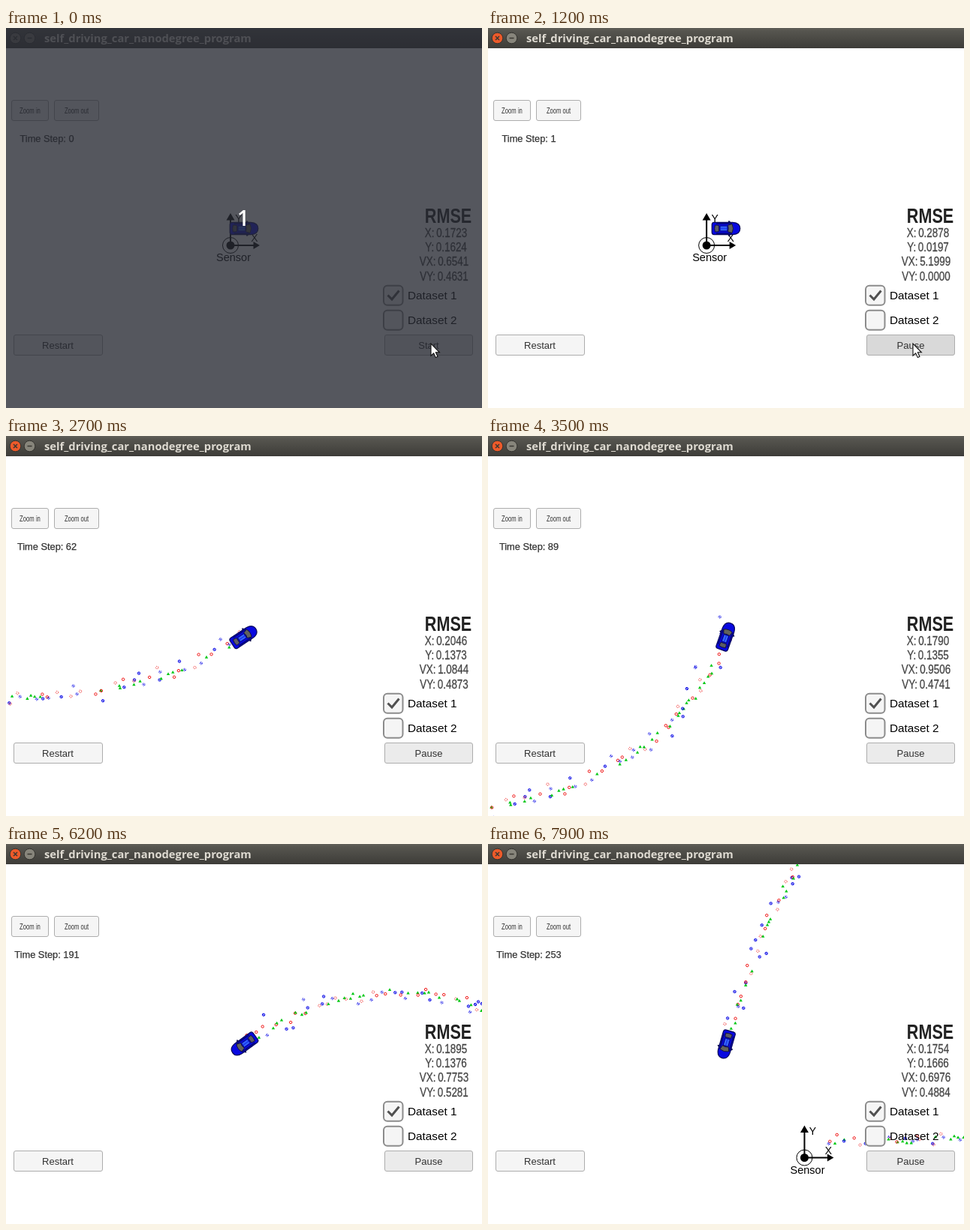
An HTML page that plays this animation: 634 px wide and 507 px high, repeating every 8000 ms.

```html
<!DOCTYPE html>
<html lang="en">
<head>
<meta charset="utf-8">
<title>Tracking simulator</title>
<style>
  html, body { margin: 0; width: 100%; height: 100%; overflow: hidden; background: #fff; }
  svg { display: block; width: 100%; height: 100%; }
  text { font-family: "Liberation Sans", Arial, sans-serif; }
  .title, .count { font-family: "Open Sans", "Noto Sans", sans-serif; }
  .title { font-weight: 700; font-size: 14.75px; }
  .count { font-weight: 600; font-size: 28px; }
</style>
</head>
<body>
<svg id="stage" viewBox="0 0 634 507" xmlns="http://www.w3.org/2000/svg">
  <defs>
    <linearGradient id="bar" x2="0" y2="1">
      <stop offset="0" stop-color="#605f58"/>
      <stop offset=".15" stop-color="#56554f"/>
      <stop offset="1" stop-color="#3d3c38"/>
    </linearGradient>
  </defs>
  <rect width="634" height="507" fill="#fff"/>

  <g id="world">
    <g id="dots" fill="none"></g>
    <g id="sensor">
      <circle r="10.5" fill="#fff" stroke="#000"/>
      <circle r="5.5"/>
      <path d="M0 0V-36M0 0H33" stroke="#000" stroke-width="2"/>
      <path d="M0 -43L5.5 -33.5H-5.5ZM39 0L30.5 5V-5Z"/>
      <g font-size="14" text-anchor="middle">
        <text x="11" y="-31">Y</text>
        <text x="32" y="-5">X</text>
        <text x="4" y="21" font-size="14.5">Sensor</text>
      </g>
    </g>
  </g>

  <g id="car">
    <path d="M6 -8L4 -10L3 -8M6 8L4 10L3 8" fill="#0a0a50" stroke="#0a0a50"/>
    <path d="M-16 -8.2H9Q18.8 -7.5 18.8 0T9 8.2H-16Q-18.8 8 -18.8 5V-5Q-18.8 -8 -16 -8.2Z"
          fill="#0808e0" stroke="#08085a" stroke-width="1.2"/>
    <path d="M-13 -6.5H8M-13 6.5H8" stroke="#06066e" stroke-width="1.4"/>
    <path d="M-14.5 -4.5L-9.5 -4V4L-14.5 4.5Q-16 0 -14.5 -4.5Z" fill="#5c5c66" stroke="#101030" stroke-width=".8"/>
    <path d="M2.5 -4.2L8 -6Q11 0 8 6L2.5 4.2Q4 0 2.5 -4.2Z" fill="#62625c" stroke="#101030" stroke-width=".8"/>
    <path d="M-8 -3.5H2V3.5H-8Z" fill="#1c3cf0" stroke="#06066e" stroke-width=".8"/>
    <path d="M-7 -1.6H1M-7 1.6H1" stroke="#4c86ff" stroke-width=".9"/>
  </g>

  <g id="ui" text-anchor="middle"></g>

  <g id="head">
    <rect width="634" height="27" fill="url(#bar)"/>
    <circle id="close" cx="12.5" cy="13.5" r="7.3" stroke="#33322e"/>
    <circle id="mini" cx="31.5" cy="13.5" r="7.3" stroke="#33322e"/>
    <path d="M10 11L15 16M15 11L10 16M28.5 13.5H34.5" stroke="#3a3833" stroke-width="1.5"/>
    <text class="title" x="51" y="18.7" fill="#dfdbd2">self_driving_car_nanodegree_program</text>
  </g>

  <g id="shade">
    <rect width="634" height="507" fill="#282b33" fill-opacity=".79"/>
    <text class="count" x="316" y="264" fill="#fff" text-anchor="middle">1</text>
  </g>
  <path id="cursor" d="M566 421V437.2L569.7 433.8L572.3 439.6L575 438.4L572.4 432.8H577.4Z"
        fill="#fff" stroke="#111" stroke-width="1.1"/>
</svg>

<script>
const LOOP = 8000, TICK = 100, HOLDS = [3600, 4700, 5000];
const CX = 317, CY = 267, LAST = 253;
const START = [18, -23], END = [-104.5, -151.5];
const NS = "http://www.w3.org/2000/svg";
const $ = id => document.getElementById(id);

function add(parent, tag, attrs, text) {
  const node = document.createElementNS(NS, tag);
  for (const key in attrs) node.setAttribute(key, attrs[key]);
  if (text !== undefined) node.textContent = text;
  parent.appendChild(node);
  return node;
}

// key points: time in ms, time step, RMSE of x, y, vx, vy
const LOG = [
  [1200, 1, 0.2878, 0.0197, 5.1999, 0],
  [2700, 62, 0.2046, 0.1373, 1.0844, 0.4873],
  [3500, 89, 0.1790, 0.1355, 0.9506, 0.4741],
  [4900, 141, 0.1952, 0.1470, 0.8733, 0.4267],
  [6200, 191, 0.1895, 0.1376, 0.7753, 0.5281],
  [7900, LAST, 0.1754, 0.1666, 0.6976, 0.4884]
];
const IDLE = [0.1723, 0.1624, 0.6541, 0.4631];

// the car turns left in one long sweep; degrees and pixels per step
const phase = n => Math.PI * n / LAST;
const heading = n => 127 * (1 - Math.cos(phase(n))) - 3 * Math.sin(3 * phase(n));
const speed = n => 7.52 + 0.45 * Math.cos(1.8 * phase(n));

function drive() {
  const path = [START];
  for (let n = 0; n < LAST; n++) {
    const [x, y] = path[n], a = heading(n + 0.5) * Math.PI / 180, v = speed(n + 0.5);
    path.push([x + v * Math.cos(a), y - v * Math.sin(a)]);
  }
  // spread the remaining gap over the whole drive
  const gap = END.map((e, k) => e - path[LAST][k]);
  return path.map((p, n) => p.map((c, k) => c + gap[k] * n / LAST));
}
const path = drive();

let seed = 20;
function rand() {
  seed = (seed + 0x6D2B79F5) | 0;
  let r = Math.imul(seed ^ seed >>> 15, 1 | seed);
  r = r + Math.imul(r ^ r >>> 7, 61 | r) ^ r;
  return ((r ^ r >>> 14) >>> 0) / 4294967296;
}
const noise = sd => (rand() + rand() + rand() + rand() - 2) * 1.73 * sd;

function ring(group, x, y, color, marked) {
  const attrs = { cx: x, cy: y, r: 1.7, stroke: color };
  if (rand() < 0.4) attrs["stroke-dasharray"] = "1 1";
  add(group, "circle", attrs);
  if (marked) add(group, "path", { d: `M${x - 1} ${y - 1}l2 2`, stroke: color });
}

// lidar and radar readings take turns; the estimate is a triangle
const marks = path.map(([x, y], n) => {
  const g = add($("dots"), "g", { display: "none" });
  if (n < 2) return g;
  if (n % 2) {
    const range = Math.hypot(x, y), dr = noise(8) / range, turn = noise(0.024);
    ring(g, x + x * dr - y * turn, y + y * dr + x * turn, "#0000e6", true);
  } else {
    ring(g, x + noise(4), y + noise(4), "#f01010", false);
  }
  if (rand() < 0.5) {
    add(g, "path", { d: `M${x + noise(2)} ${y + noise(2) - 2}l2.2 3.8h-4.4z`, fill: "#00c814" });
  }
  return g;
});

// controls
const ui = $("ui");
const label = (x, y, size, text, fill = "#323232", squeeze = 1, weight = 400) =>
  add(ui, "text", {
    transform: `translate(${x} ${y}) scale(${squeeze} 1)`,
    "font-size": size, "font-weight": weight, fill
  }, text);
const button = (x, y, w, fill = "#f5f5f5") =>
  add(ui, "rect", { x: x + .5, y: y + .5, width: w - 1, height: 27, rx: 2.5, fill, stroke: "#adadad" });
function embolden(node, width) {
  node.setAttribute("stroke", node.getAttribute("fill"));
  node.setAttribute("stroke-width", width);
  return node;
}

button(7, 96, 50);
label(32, 114, 11.5, "Zoom in", "#323232", 0.67);
button(64, 96, 60);
label(94, 114, 11.5, "Zoom out", "#323232", 0.66);
const stepText = embolden(label(54.5, 152, 12.8, ""), 0.25);
button(10, 409, 119);
label(69, 428, 13, "Restart");
const runButton = button(504, 409, 118);
const runText = label(563, 428, 13, "");

label(589, 260, 27, "RMSE", "#222", 0.8, 700);
const NAMES = ["X", "Y", "VX", "VY"];
const errors = NAMES.map((name, i) =>
  embolden(label(i < 2 ? 586 : 583.5, 279 + 19.2 * i, 17, "", "#444", 0.79), 0.3));

[343, 376].forEach((y, i) => {
  add(ui, "rect", { x: 503, y: y + .7, width: 25.5, height: 26, rx: 5, fill: "#f5f5f5", stroke: "#8c8c8c", "stroke-width": 2 });
  add(ui, "text", { x: 535, y: y + 18.8, "font-size": 15.3, "text-anchor": "start" }, "Dataset " + (i + 1));
});
add(ui, "path", { d: "M508.5 356.5L514 362L523.5 350.5", fill: "none", stroke: "#505050", "stroke-width": 3 });

function reading(time) {
  if (time < LOG[0][0]) return { step: 0, values: IDLE };
  let i = 0;
  while (i < LOG.length - 2 && LOG[i + 1][0] <= time) i++;
  const a = LOG[i], b = LOG[i + 1];
  const step = Math.round(a[1] + (b[1] - a[1]) * (time - a[0]) / (b[0] - a[0]));
  // mean errors settle with the root of the sample count
  const w = n => 1 / Math.sqrt(n);
  const u = (w(step) - w(a[1])) / (w(b[1]) - w(a[1]));
  return { step, values: [2, 3, 4, 5].map(k => a[k] + (b[k] - a[k]) * u) };
}

function draw(now) {
  let time = Math.floor(now % LOOP / TICK) * TICK;
  if (HOLDS.includes(time)) time -= TICK;
  const { step, values } = reading(time), [x, y] = path[step];
  const running = time >= LOG[0][0];

  $("world").setAttribute("transform", `translate(${CX - x} ${CY - y})`);
  $("car").setAttribute("transform", `translate(${CX} ${CY + .5}) rotate(${-heading(step)})`);
  marks.forEach((g, n) => g.setAttribute("display", n <= step ? "inline" : "none"));

  stepText.textContent = "Time Step: " + step;
  errors.forEach((t, i) => t.textContent = NAMES[i] + ":\u2009" + values[i].toFixed(4));
  runText.textContent = running ? "Pause" : "Start";
  runButton.setAttribute("fill", time === LOG[0][0] ? "#d9d9d9" : "#ebebeb");

  $("close").setAttribute("fill", running ? "#ec5a2a" : "#7a786f");
  $("mini").setAttribute("fill", running ? "#87857b" : "#7a786f");
  $("shade").setAttribute("display", time < 100 ? "inline" : "none");
  $("cursor").setAttribute("display", time < 1500 ? "inline" : "none");
}

function frame(now) {
  draw(now);
  requestAnimationFrame(frame);
}
draw(0);
requestAnimationFrame(frame);
</script>
</body>
</html>
```
